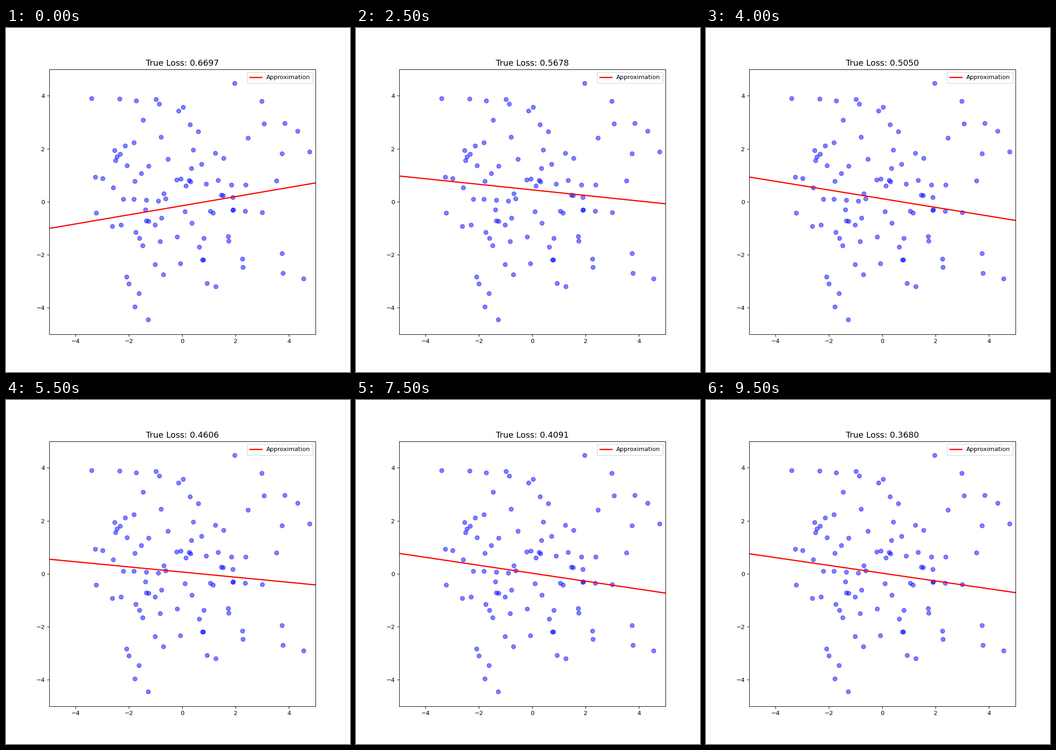
Recreate the animation shown at these times as a matplotlib script. Size 748 px wide and 748 px high, loop 10 s.

```python
import numpy as np
import matplotlib.pyplot as plt
from matplotlib.animation import FuncAnimation

STEPS = 20
LIMIT = 5
SPREAD = 2

# Key poses of the fit: step, slope, intercept, loss
KEYS = np.array([
    (0, 0.172, -0.150, 0.6697),
    (3, 0.029, 0.317, 0.6038),
    (5, -0.105, 0.447, 0.5678),
    (8, -0.164, 0.114, 0.5050),
    (11, -0.097, 0.063, 0.4606),
    (15, -0.150, 0.018, 0.4091),
    (19, -0.147, 0.020, 0.3680),
])


def fit_at(step):
    """Slope, intercept and loss, moving evenly between key poses."""
    key_steps, *tracks = KEYS.T
    return [np.interp(step, key_steps, track) for track in tracks]


np.random.seed(0)
x, y = SPREAD * np.random.randn(100, 2).T
edges = np.array([-LIMIT, LIMIT])
ticks = range(-4, 5, 2)

fig, ax = plt.subplots(figsize=(8, 8), dpi=93.5)
ax.scatter(x, y, s=50, color="blue", alpha=0.5)
line, = ax.plot(edges, edges, color="red", lw=2, label="Approximation")
ax.set(xlim=edges, ylim=edges, xticks=ticks, yticks=ticks)
ax.legend(loc="upper right")
title = ax.set_title("", fontsize=14)


def update(step):
    slope, intercept, loss = fit_at(step)
    line.set_ydata(slope * edges + intercept)
    title.set_text(f"True Loss: {loss:.4f}")
    return line, title


anim = FuncAnimation(fig, update, frames=STEPS, interval=500,
                     repeat=True, repeat_delay=0)
plt.show()
```
